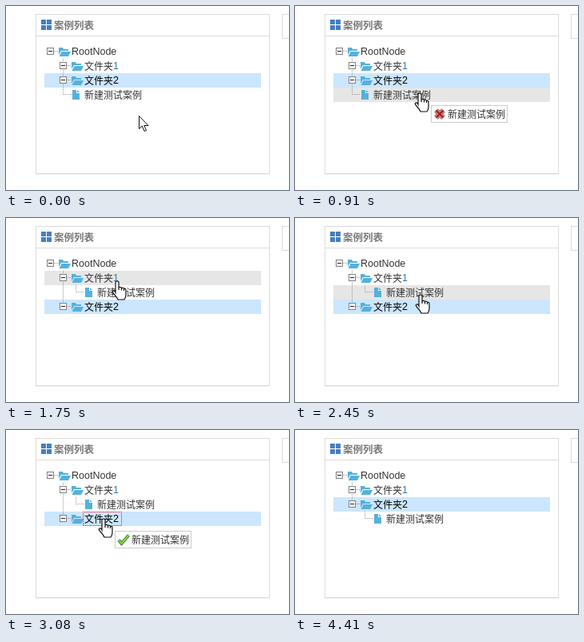
An HTML page with a canvas for the animation above (4620 ms loop, 354 by 230 pixels).

```html
<!DOCTYPE html>
<html lang="zh-CN">
<head>
<meta charset="utf-8">
<title>案例列表</title>
<style>
html, body { margin: 0; width: 100%; height: 100%; overflow: hidden; background: #fff; }
canvas { display: block; }
</style>
</head>
<body>
<canvas id="stage" width="354" height="230"></canvas>
<script>
const g = document.getElementById('stage').getContext('2d');
const LOOP = 4620, STEP = 70, TOP = 48, ROW = 18;
const HAN = '12px "Noto Sans CJK SC", "Noto Sans CJK", sans-serif';
const TITLE = 'bold 12.5px "Noto Sans CJK SC", "Noto Sans CJK", sans-serif';
const LATIN = '12.5px "Liberation Sans", Arial, sans-serif';
const ICON = '#55b1db', INK = '#333';

const root = { latin: 'RootNode', level: 0, box: true };
const one = { label: '文件夹', digit: '1', tint: '#2f7ba6', level: 1, box: true };
const two = { label: '文件夹', digit: '2', level: 1, box: true, selected: true };
const loose = { label: '新建测试案例', level: 1 };
const nested = { ...loose, level: 2 };

// Pointer stops: time, x, y
const stops = [
  [0, 167, 137], [70, 167, 137], [630, 150, 114], [700, 150, 113], [770, 150, 113],
  [910, 156, 109], [1190, 139, 79], [2030, 139, 79], [2450, 157, 96], [2660, 157, 96],
  [3080, 122, 111], [3920, 122, 111], [4410, 108, 240], [LOOP, 108, 240]
];
const drags = [[910, 1750], [2800, 3570]];

const shapes = {
  folder: new Path2D('M0 10V1H5L6 3H12V5H3ZM3.5 6H15L12 12H.5Z'),
  file: new Path2D('M0 0H5V4H9V12H0ZM6 0L9 3H6Z'),
  arrow: new Path2D('M0 0V16L3.8 12.5L6.5 19L9 18L6.3 12H11.5Z'),
  hand: new Path2D('M-2 2Q-2 0 0 0T2 2V8Q4 6.5 5.5 8.5Q7.5 7.5 8.5 9.5Q11 8.5 11 12V17Q11 20 9 23H1Q0 20-4 16Q-7 12.5-5 12T-2 14ZM2 8V11M5.5 8.5V11.5M8.5 9.5V12'),
  cross: new Path2D('M3.5 3.5L12.5 12.5M12.5 3.5L3.5 12.5'),
  check: new Path2D('M2 8.5L5.5 13L14.5 2.5')
};

function rect(x, y, w, h, color) {
  g.fillStyle = color;
  g.fillRect(x, y, w, h);
}

function text(str, x, y, color, font) {
  g.font = font;
  g.fillStyle = color;
  g.fillText(str, x, y);
}

function frame(x, y, w, h, color) {
  g.strokeStyle = color;
  g.lineWidth = 1;
  g.strokeRect(x + .5, y + .5, w - 1, h - 1);
}

function dotted(paint) {
  g.setLineDash([1, 1]);
  paint();
  g.setLineDash([]);
}

function dots(x1, y1, x2, y2, color = '#999') {
  g.strokeStyle = color;
  g.lineWidth = 1;
  g.beginPath();
  g.moveTo(x1, y1);
  g.lineTo(x2, y2);
  dotted(() => g.stroke());
}

function shape(path, x, y, fill, ...strokes) {
  g.save();
  g.translate(x, y);
  if (fill) {
    g.fillStyle = fill;
    g.fill(path);
  }
  for (const [color, width] of strokes) {
    g.strokeStyle = color;
    g.lineWidth = width;
    g.stroke(path);
  }
  g.restore();
}

function pointerAt(t) {
  const i = stops.findIndex(s => s[0] > t);
  const [t0, x0, y0] = stops[i - 1], [t1, x1, y1] = stops[i];
  const p = (t - t0) / (t1 - t0), e = p * p * (3 - 2 * p);
  return { x: Math.round(x0 + (x1 - x0) * e), y: Math.round(y0 + (y1 - y0) * e) };
}

function drawPanel() {
  rect(0, 0, 354, 230, '#fff');
  rect(37, 210, 293, 1, '#f0f0f0');
  frame(37, 10, 293, 200, '#dcdcdc');
  rect(38, 37, 291, 1, '#ddd');
  frame(345, 10, 20, 31, '#dcdcdc');
  for (const x of [44, 51]) for (const y of [17, 24]) rect(x, y, 6, 6, '#4480bd');
  text('案例列表', 60, 29, '#777', TITLE);
}

function drawRow(node, i, rows, hovered) {
  const y = TOP + i * ROW, mid = y + 8.5, x = 66 + 16 * node.level;
  if (node.selected) rect(48, y, 271, ROW, '#cce6ff');
  else if (hovered) rect(48, y, 271, ROW, '#e6e6e6');

  for (let level = 1; level <= node.level; level++) {
    const more = rows.slice(i + 1).some(r => r.level === level);
    const end = more ? y + ROW : level === node.level ? mid : y;
    dots(55.5 + 16 * level, y, 55.5 + 16 * level, end);
  }
  dots(x - 10, mid, x - 1, mid);
  if (node.box) {
    rect(x - 15, y + 4, 9, 9, '#fff');
    frame(x - 15, y + 4, 9, 9, '#808080');
    rect(x - 13, y + 8, 5, 1, '#222');
    shape(shapes.folder, x, y + 3, ICON);
  } else {
    shape(shapes.file, x + 1, y + 3, ICON);
  }

  const color = node.selected ? '#000' : INK;
  if (node.latin) text(node.latin, x + 16, y + 13, color, LATIN);
  if (node.label) text(node.label, x + 16, y + 14, color, HAN);
  if (node.digit) text(node.digit, x + 52, y + 13, node.tint || color, LATIN);
}

function drawDropMark(node, i, pointerY) {
  const y = TOP + i * ROW, x = 80 + 16 * node.level;
  if (pointerY - y < 5) dots(48, y + .5, 319, y + .5, 'red');
  else if (y + ROW - pointerY < 5) dots(48, y + 17.5, 319, y + 17.5, 'red');
  else {
    g.lineDashOffset = .5;
    dotted(() => frame(x, y, 49, 18, 'red'));
    g.lineDashOffset = 0;
  }
}

function drawProxy(x, y, allowed) {
  rect(x, y, 96, 22, '#fff');
  frame(x, y, 96, 22, '#ccc');
  if (allowed) shape(shapes.check, x + 3, y + 3, null, ['#3c7a2c', 3.8], ['#7fd84f', 2]);
  else shape(shapes.cross, x + 3, y + 3, null, ['#5e1a1a', 6], ['#f0dada', 4.4], ['#b01c1c', 2.8]);
  text('新建测试案例', x + 21, y + 16, INK, HAN);
}

function draw(now) {
  const t = Math.floor(now % LOOP / STEP) * STEP;
  const rows = t < 1750 ? [root, one, two, loose]
    : t < 3570 ? [root, one, nested, two] : [root, one, two, nested];
  const { x, y } = pointerAt(t);
  const over = Math.floor((y - TOP) / ROW), target = rows[over];
  const dragging = drags.some(([a, b]) => t >= a && t < b);

  drawPanel();
  rows.forEach((node, i) => drawRow(node, i, rows, i === over));
  if (dragging) {
    const allowed = Boolean(target && target.box);
    if (allowed) drawDropMark(target, over, y);
    drawProxy(x + 14, y + 15, allowed);
  }
  if (target) shape(shapes.hand, x, y, '#fff', ['#111', 1.2]);
  else shape(shapes.arrow, x - .5, y + .5, '#fff', ['#111', 1]);
}

const start = performance.now();
(function tick() {
  draw(performance.now() - start);
  requestAnimationFrame(tick);
})();
</script>
</body>
</html>
```
